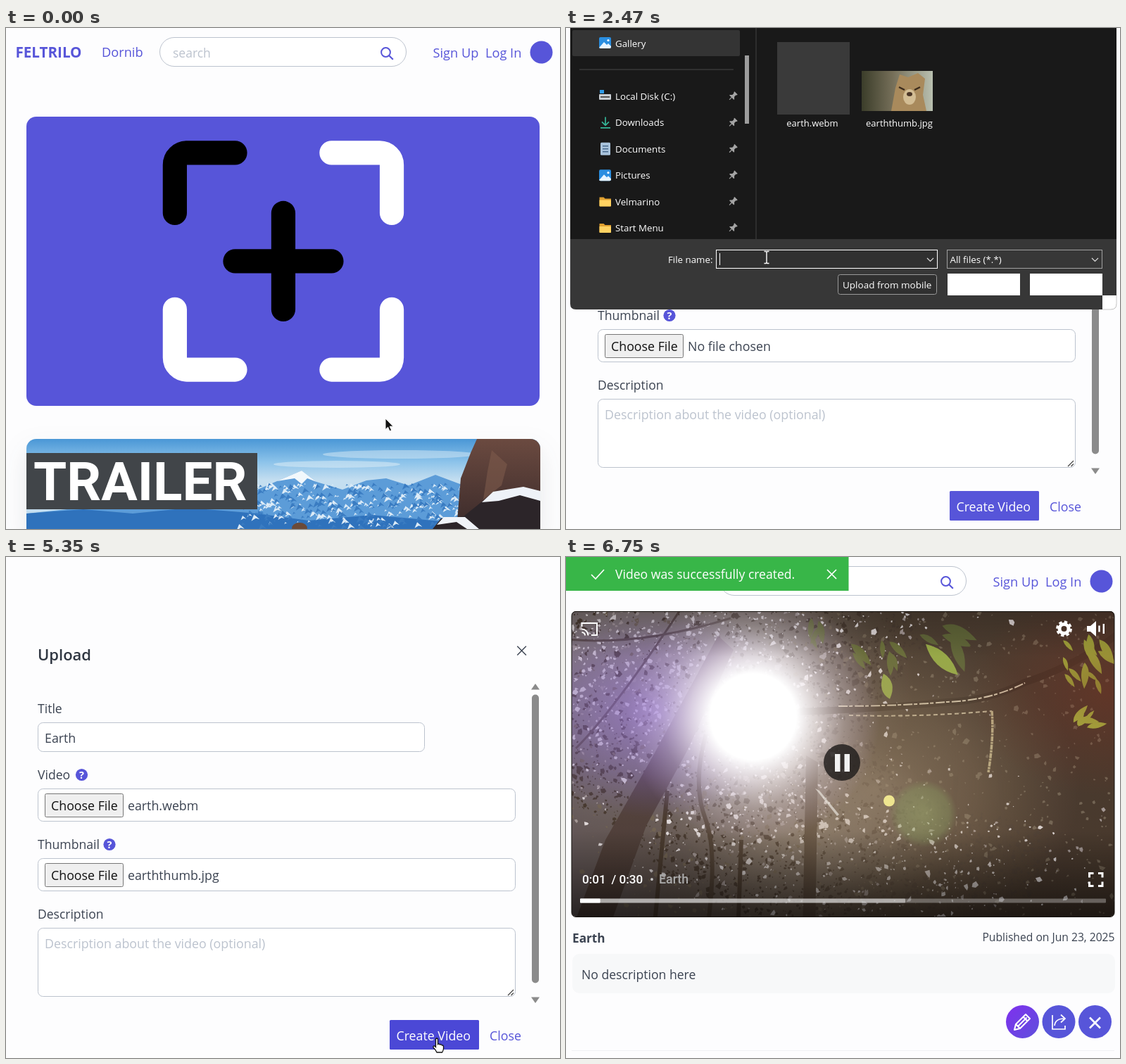
Recreate the animation shown at these times as an HTML page. Size 787x712 px, loop 6830 ms.

```html
<!DOCTYPE html>
<html lang="en">
<head>
<meta charset="utf-8">
<title>Upload a video</title>
<style>
html, body { margin: 0; width: 100%; height: 100%; overflow: hidden; background: #fdfdfe; }
svg { display: block; }
text { font-family: "Open Sans", "Noto Sans", sans-serif; white-space: pre; }
.player text { font-family: Roboto, Arial, sans-serif; font-weight: 500; }
</style>
</head>
<body>
<svg id="stage" width="787" height="712" viewBox="0 0 787 712"></svg>
<script>
const LOOP = 6830, OPEN = 740, PLAY = 5600;
const INK = '#3b4351', BLUE = '#5755d9', LINE = '#bcc3ce', PAGE = '#fdfdfe';

const text = (x, y, s, size = 17.8, fill = INK, more = '') =>
  `<text x="${x}" y="${y}" font-size="${size}" fill="${fill}" ${more}>${s}</text>`;
const rect = (x, y, w, h, fill, r = 0, more = '') =>
  `<rect x="${x}" y="${y}" width="${w}" height="${h}" rx="${r}" fill="${fill}" ${more}/>`;
const circle = (x, y, r, fill, more = '') =>
  `<circle cx="${x}" cy="${y}" r="${r}" fill="${fill}" ${more}/>`;
const oval = (x, y, rx, ry, fill, more = '') =>
  `<ellipse cx="${x}" cy="${y}" rx="${rx}" ry="${ry}" fill="${fill}" ${more}/>`;
const path = (d, fill, more = '') => `<path d="${d}" fill="${fill}" ${more}/>`;
const line = (d, color, w = 1.5, more = '') =>
  `<path d="${d}" fill="none" stroke="${color}" stroke-width="${w}" ${more}/>`;
const group = (id, body, more = '') => `<g id="${id}" ${more}>${body}</g>`;
const stops = list => list.map(([o, c, a = 1]) =>
  `<stop offset="${o}" stop-color="${c}" stop-opacity="${a}"/>`).join('');
const linear = (id, dir, list) => `<linearGradient id="${id}" ${dir}>${stops(list)}</linearGradient>`;
const radial = (id, list) => `<radialGradient id="${id}">${stops(list)}</radialGradient>`;
const DOWN = 'x2="0" y2="1"';

const seeded = s => () => (s = s * 16807 % 2147483647) / 2147483647;
const bell = (x, y, cx, cy, w, h) => Math.exp(-(((x - cx) / w) ** 2) - ((y - cy) / h) ** 2);

const defs = `<defs>
${linear('sky', DOWN, [[0, '#4a97d6'], [.25, '#8cc3ea'], [.45, '#c4def0'], [1, '#c4def0']])}
${linear('rock', DOWN, [[0, '#6b4a40'], [1, '#3a2a2a']])}
${linear('wood', '', [[0, '#4a464c'], [.35, '#453e33'], [.55, '#2f281d'], [1, '#271e15']])}
${linear('bark', DOWN, [[0, '#5a4b58'], [.4, '#3a2f30'], [1, '#261e1a']])}
${linear('fur', '', [[0, '#3b3d2a'], [.45, '#77705a'], [1, '#b9c0b0']])}
${linear('scrim', DOWN, [[0, '#000', .2], [.15, '#000', 0], [.72, '#000', 0], [1, '#000', .6]])}
${linear('edit', 'y2="1"', [[0, '#7f30ee'], [1, '#5f50dc']])}
${radial('glare', [[0, '#eef0f8', .5], [.5, '#c8cbd6', .3], [1, '#a0a0a8', 0]])}
${radial('sun', [[0, '#fff'], [.34, '#fff'], [.5, '#fffaff', .7], [.72, '#f0e6f8', .3], [1, '#d8c0f0', 0]])}
${radial('violet', [[0, '#9a78d8', .75], [.6, '#7f62b8', .4], [1, '#7058a8', 0]])}
${radial('haze', [[0, '#c0a888', .75], [.5, '#a89070', .5], [1, '#907860', 0]])}
${radial('rust', [[0, '#7a3222', .8], [1, '#7a3222', 0]])}
${radial('green', [[0, '#9fb070', .7], [.75, '#8ea565', .5], [1, '#8ea565', 0]])}
<clipPath id="thumbClip">${rect(29, 584, 730, 160, '#000', 14)}</clipPath>
<clipPath id="videoClip">${rect(8, 77, 771, 434, '#000', 6)}</clipPath>
<clipPath id="furClip">${rect(420, 61, 101, 57, '#000')}</clipPath>
</defs>`;

function header() {
  return text(13.5, 42, 'FELTRILO', 20.6, BLUE, 'font-weight="700"') +
    text(136, 41, 'Dornib', 18.2, BLUE) +
    rect(218.5, 13.5, 350, 41, '#fff', 20.5, `stroke="${LINE}"`) +
    text(237, 42, 'search', 17.5, LINE) +
    circle(539.5, 34.5, 6.4, 'none', `stroke="${BLUE}" stroke-width="2"`) +
    line('M544.2 39.2l5.6 5.6', BLUE, 2.2) +
    text(606.5, 42, 'Sign Up', 18.2, BLUE) + text(681, 42, 'Log In', 18.2, BLUE) +
    circle(760.5, 34.5, 16, BLUE);
}

function mountains() {
  const rnd = seeded(77);
  let snow = '', shade = '';
  for (let i = 0; i < 420; i++) {
    const x = 330 + rnd() * 350, y = 646 + rnd() * 60, w = 2 + rnd() * 6;
    const d = `M${x} ${y}l${w} ${w * .9}l${-w * .7} ${-w * .2}l${-w * .8} ${w * .5}z`;
    if (i % 2) snow += d; else shade += d;
  }
  return rect(29, 584, 730, 130, 'url(#sky)') +
    oval(560, 606, 110, 6, '#d5e9f6', 'opacity=".5"') + oval(470, 620, 90, 5, '#e2f0f8', 'opacity=".5"') +
    path('M29 690L357 656L385 644L420 629L441 645L478 656L512 643L540 640L572 650L610 635L650 650V712H29z', '#5c9cd8') +
    path('M29 712V690L110 684L180 690L260 682L357 690L430 700L520 692L650 704V712z', '#2f72bc') +
    path(snow, '#dcebf7') + path(shade, '#3a7cc2') +
    path('M385 644L420 629L441 645L428 640L420 648L410 640z', '#f2f8fc') +
    path('M669 584H759V712H640L646 640L660 604z', 'url(#rock)') +
    path('M690 600l22 20l-8 30l-26 20l6-40z', '#7d5a4c', 'opacity=".6"') +
    path('M606 712L618 697L650 694L690 662L735 655L759 662V712z', '#2c2529') +
    path('M612 706L622 695L652 695L672 712H655L640 702z', '#f0f3f8') +
    path('M676 674L692 659L735 652L759 658V672L730 664L700 672z', '#eef2f8') +
    oval(417, 711, 11, 8, '#6b4a38') +
    rect(29, 604, 328, 80, '#414549') +
    text(39, 670.5, 'TRAILER', 76.5, '#fff', 'style="font-family:Roboto,Arial,sans-serif;font-weight:700"');
}

function home() {
  const corner = (turn, color) =>
    line('M3 8V4A1 1 0 0 1 4 3H8', color, 2, `transform="rotate(${turn} 12 12)"`);
  return rect(0, 0, 787, 712, PAGE) + header() + rect(29, 126, 729, 411, BLUE, 14) +
    `<g transform="translate(188.5 126) scale(17.12)" stroke-linecap="round">` +
    corner(0, '#000') + corner(90, '#fff') + corner(180, '#fff') + corner(270, '#fff') +
    line('M12 8v8M8 12h8', '#000', 2) + '</g>' +
    `<g style="filter:drop-shadow(0 16px 18px rgba(48,55,66,.1))"><g clip-path="url(#thumbClip)">${mountains()}</g></g>`;
}

function field(id, y, w, h) {
  return rect(45.5, y + .5, w, h, '#fff', 7, `stroke="${LINE}"`) +
    group(id + 'Focus', rect(45.5, y + .5, w, h, 'none', 7, `stroke="${BLUE}"`) +
      rect(44.5, y - .5, w + 2, h + 2, 'none', 8, `stroke="${BLUE}" stroke-opacity=".2" stroke-width="2"`));
}

function filePicker(id, label, y, helpX) {
  return text(45, y - 13, label, 17.6) + circle(helpX, y - 19.5, 8.6, BLUE) +
    text(helpX, y - 14.5, '?', 14.5, '#fff', 'text-anchor="middle" font-weight="700"') +
    field(id, y, 678, 46) +
    rect(55.5, y + 7.5, 111, 33, '#efefef', 2, 'stroke="#767676"') +
    text(64, y + 31, 'Choose File', 17.8, '#111') +
    text(173, y + 31, '', 17.8, INK, `id="${id}Name"`);
}

function modal() {
  return rect(0, -40, 787, 800, PAGE) +
    text(45, 147, 'Upload', 22, '#303742', 'font-weight="600"') +
    line('M726.3 126.8l12.6 12.6m0-12.6l-12.6 12.6', INK, 1.4) +
    path('M752 180l6 8.5h-12z', '#8b8b8b') + path('M752 634l6-8.5h-12z', '#8b8b8b') +
    rect(747, 195.5, 10, 410, '#8b8b8b', 5) +
    text(45, 222, 'Title', 17.6) + field('title', 235, 549, 41) +
    text(55, 264, '', 17.8, INK, 'id="titleText"') +
    rect(55, 246, 1.2, 23, '#222', 0, 'id="titleCaret"') +
    filePicker('video', 'Video', 329, 107.5) + filePicker('thumb', 'Thumbnail', 428, 147) +
    text(45, 514, 'Description', 17.5) +
    rect(45.5, 527.5, 678, 97, '#fff', 7, `stroke="${LINE}"`) +
    text(55, 556, 'Description about the video (optional)', 17.8, LINE) +
    line('M713 623l8-8m-3.5 8l3.5-3.5', '#444', 1.2) +
    rect(545, 658, 127, 42, BLUE, 1.5, 'id="create"') +
    text(554.5, 687, 'Create Video', 17.8, '#fff') + text(687, 687, 'Close', 17.8, BLUE);
}

function dialog() {
  const small = (x, y, s, more) => text(x, y, s, 13.3, '#fff', more);
  const picture = y => rect(47, y - 8, 17, 16, '#2a8ee0', 2) +
    path(`M47 ${y + 7}l7-8l4 4l2-2l4 4v1q0 2-2 2H49q-2 0-2-2z`, '#e8f5ff') + circle(60, y - 3.5, 1.6, '#fff');
  const folder = y => path(`M47.5 ${y - 6}h6l2 2h8.5v10q0 1-1 1H48.5q-1 0-1-1z`, '#e0a030') +
    path(`M47.5 ${y - 2}h16.5v8q0 1-1 1H48.5q-1 0-1-1z`, '#ffd262');
  const icons = [
    y => rect(47, y - 3, 17, 8, '#c9ced3', 1) + rect(48, y - 9, 6, 5, '#2f9be8') + rect(49, y, 13, 2, '#555'),
    y => line(`M56 ${y - 8}v12m-5-5l5 5l5-5M49 ${y + 7.5}h14`, '#35b597', 1.7),
    y => rect(49, y - 9, 14, 18, '#a9c3dc', 1.5) + line(`M52 ${y - 4}h8m-8 4h8m-8 4h8`, '#4a6c90', 1.6),
    picture, folder, folder];
  const names = ['Local Disk (C:)', 'Downloads', 'Documents', 'Pictures', 'Velmarino', 'Start Menu'];
  const rows = names.map((name, i) => {
    const y = 97 + i * 37.4;
    return icons[i](y) + small(70, y + 5, name) +
      `<g transform="translate(237 ${y}) rotate(45)">` +
      path('M-3-6.5h6v1.5l-1 1v3l2.5 2.5v1H-4.5v-1L-2-1v-3l-1-1z', '#a5a5a5') +
      line('M0 2v5', '#a5a5a5', 1.2) + '</g>';
  }).join('');
  const fur = `<g clip-path="url(#furClip)">` + rect(420, 61, 101, 57, 'url(#fur)') +
    path('M462 118L468 85L474 66L486 70L500 64L510 72L507 95L512 118z', '#a98a5c') +
    oval(488, 98, 9, 11, '#d3bd94') + oval(488, 94, 4, 3, '#4a3526') +
    line('M473 84l8 4m14 0l8-4', '#3b2b1c', 2.5) + '</g>';
  return path('M6 0H782V392q0 8-8 8H14q-8 0-8-8z', '#373737') + rect(6, 0, 776, 300, '#191919') +
    path('M762 380H782V392q0 8-8 8H762z', '#fff') + line('M782 380V392q0 8-8 8H762', '#c8c8c8', 1) +
    rect(9, 3, 238, 37, '#343434', 2) + picture(21) + small(70, 27, 'Gallery') +
    rect(19, 58.5, 219, 1, '#484848') + rect(254, 39, 6, 97, '#9d9d9d') +
    rect(269, 0, 2, 300, '#2d2d2d') + rows +
    rect(300, 20, 103, 103, '#3a3a3a') + fur +
    text(350, 140, 'earth.webm', 13, '#fff', 'text-anchor="middle"') +
    text(473.5, 140, 'earththumb.jpg', 13, '#fff', 'text-anchor="middle"') +
    small(145, 334, 'File name:') +
    rect(213.5, 315.5, 314, 26, '#303030', 0, 'stroke="#fff"') +
    line('M513 327l4.5 4.5l4.5-4.5M747 327l4.5 4.5l4.5-4.5', '#ddd', 1.1) +
    rect(541.5, 315.5, 220, 26, 'none', 0, 'stroke="#a0a0a0"') +
    small(545.5, 334, 'All files (*.*)') +
    small(218, 334, '', 'id="fileText"') + rect(218, 320, 1, 17, '#fff', 0, 'id="fileCaret"') +
    rect(386.5, 350.5, 140, 28, '#303030', 3, 'stroke="#9a9a9a"') +
    text(393, 370, 'Upload from mobile', 13.5, '#fff') +
    rect(542, 349, 103, 31, '#fff') + rect(659, 349, 103, 31, '#fff');
}

// Leaves hanging around a point, all leaning roughly one way.
function leaves(seed, x, y, n, w, h, size, lean, color) {
  const rnd = seeded(seed);
  let out = '';
  for (let i = 0; i < n; i++) {
    const s = size * (.6 + rnd() * .6), a = lean + (rnd() - .5) * 70;
    out += path(`M0 0Q${s * .35} ${-s * .34} ${s} 0Q${s * .45} ${s * .24} 0 0z`, color,
      `transform="translate(${x + (rnd() - .5) * w} ${y + (rnd() - .5) * h}) rotate(${a})"`);
  }
  return out;
}

// Foliage: many small ragged flecks, brighter where the sky shines through.
function foliage() {
  const rnd = seeded(4242);
  const tones = { '#262019': '', '#5d5647': '', '#9d9a9c': '', '#eceff5': '' };
  const fleck = (x, y, r) => {
    let d = '';
    for (let k = 0; k < 5; k++) {
      const a = k * 1.257, q = r * (.35 + rnd());
      d += `${k ? 'L' : 'M'}${(x + q * Math.cos(a)).toFixed(1)} ${(y + q * Math.sin(a)).toFixed(1)}`;
    }
    return d + 'z';
  };
  for (let i = 0; i < 9000; i++) {
    const x = rnd() * 800, y = 50 + rnd() * 500, pick = rnd(), r = 1 + rnd() * rnd() * 4.5;
    const sky = bell(x, y, 130, 170, 200, 150) + .7 * bell(x, y, 300, 390, 130, 100) +
      .4 * bell(x, y, 520, 450, 170, 70) + .25 * bell(x, y, 400, 130, 120, 70);
    const tone = pick < sky * .5 ? '#eceff5' : pick < sky * .7 ? '#9d9a9c' : pick < sky * .7 + .12 ? '#5d5647' : '#262019';
    if (tone !== '#262019' || sky > .12) tones[tone] += fleck(x, y, r);
  }
  return Object.entries(tones).map(([c, d]) => path(d, c)).join('');
}

function forest() {
  const back = oval(170, 200, 330, 230, 'url(#glare)') + oval(330, 410, 210, 150, 'url(#glare)', 'opacity=".6"') +
    foliage() +
    path('M222 130L244 150L180 290L120 400L62 560H10L62 420L130 300z', 'url(#bark)') +
    path('M347 300L364 310L360 560H342z', '#2c251d') +
    line('M205 270Q185 340 204 390T205 560', '#30291f', 6) +
    line('M150 350L130 560M255 420L250 560M560 330L548 560M620 300L640 560', '#2a2219', 6) +
    line('M8 135Q110 145 240 105M20 290Q80 230 190 60', '#3a322f', 3);
  const bough = line('M330 254Q440 250 540 240Q600 238 650 212Q720 190 787 140', '#1d160f', 10) +
    line('M385 246Q470 246 540 240Q600 238 650 213', '#e9e2c4', 2, 'stroke-dasharray="13 2 5 3"') +
    line('M400 259Q500 262 603 253', '#cfc7a5', 2, 'stroke-dasharray="6 4"') +
    line('M603 253Q606 290 598 340', '#c5bd8c', 3.5, 'stroke-dasharray="7 1 3 1"');
  const far = leaves(12, 722, 185, 13, 60, 70, 34, 65, '#a4cc2c') + leaves(9, 718, 280, 7, 36, 14, 30, -28, '#b4dc34');
  const near = leaves(5, 440, 215, 6, 80, 50, 42, 75, '#4f6224') + leaves(41, 535, 190, 5, 60, 30, 48, 35, '#465824') +
    leaves(8, 375, 190, 4, 30, 50, 34, 95, '#4d5e26') +
    leaves(31, 645, 95, 18, 110, 40, 32, 40, '#82ac2c') +
    path('M525 210Q560 218 571 254Q535 246 525 210z', '#8fb536') + path('M465 252Q485 264 474 288Q456 278 465 252z', '#93b83a');
  return rect(8, 77, 771, 434, 'url(#wood)') + group('back', back) + group('bough', bough) +
    group('far', far) + group('near', near) +
    rect(8, 77, 771, 434, '#b58f78', 0, 'id="veil"') +
    oval(440, 330, 290, 230, 'url(#haze)', 'id="hazeGlow"') +
    oval(770, 190, 200, 150, 'url(#rust)', 'id="rustGlow"') +
    oval(130, 220, 220, 150, 'url(#violet)', 'id="violetGlow"') +
    circle(266, 227, 100, 'url(#sun)', 'id="sunDisc"') +
    circle(508, 365, 48, 'url(#green)', 'id="flare"') + circle(459, 346.5, 8, '#eee58f') +
    path('M354 329L360 332L388 366L385 368z', '#e8e4dc', 'opacity=".7"') + rect(8, 77, 771, 434, 'url(#scrim)');
}

function player() {
  const W = '#fff';
  return `<g clip-path="url(#videoClip)">${forest()}</g>` +
    rect(8, 77.5, 771, 434, 'none', 6, 'stroke="#15120e"') +
    line('M22.5 99v-5H44v17H36M22.5 107a4.5 4.5 0 0 1 4.5 4.5M22.5 102.5a9 9 0 0 1 9 9', W, 2) +
    circle(707.5, 102, 6.5, 'none', 'stroke="#fff" stroke-width="5"') +
    circle(707.5, 102, 9.6, 'none', 'stroke="#fff" stroke-width="3.6" stroke-dasharray="4.3 3.24"') +
    path('M740 98h5l8-7v22l-8-7h-5z', W) + line('M757.5 97.5v9M763.8 95v14', W, 2.4) +
    circle(392, 292, 26, '#1c1a18', 'opacity=".8"') + rect(382, 280, 7.5, 25, '#f2f2f2') + rect(395.5, 280, 7.5, 25, '#f2f2f2') +
    text(23, 464, '', 17.1, W, 'id="clock"') + text(64.5, 464, '/ 0:30', 17.1, W) +
    text(119, 464, '•', 17, '#c4c4c4') + text(132, 464, 'Earth', 17.8, '#aaa') +
    line('M743.5 455.5v-6h6M756 449.5h6v6M762 461.5v6h-6M749.5 467.5h-6v-6', W, 3) +
    rect(20, 485.5, 747, 6, W, 1, 'opacity=".3"') + rect(20, 485.5, 462, 6, W, 1, 'opacity=".45"') +
    rect(20, 485.5, 0, 6, W, 1, 'id="played"');
}

function watch() {
  return rect(0, 0, 787, 712, PAGE) + header() +
    rect(0, 0, 401.5, 48, '#38b648') + line('M36 25l6 6l12-13M371 18l13 13m0-13l-13 13', '#fff', 1.7) +
    text(70, 31, 'Video was successfully created.', 17.6, '#fff') +
    `<g class="player">${player()}</g>` +
    text(9, 548, 'Earth', 17.2, INK, 'font-weight="700"') +
    text(779.5, 546, 'Published on Jun 23, 2025', 15.65, INK, 'text-anchor="end"') +
    rect(9, 564, 771, 56, '#f7f8f9', 10) + text(22, 600, 'No description here', 17.6) +
    circle(648.5, 660.5, 23.5, 'url(#edit)') + circle(700, 660.5, 23.5, BLUE) + circle(751.5, 660.5, 23.5, BLUE) +
    line('M637 672l2-8l14-14l6 6l-14 14zM639 664l6 6M649.5 653.5l6 6M642.5 666.5l12-12', '#fff', 2.1, 'stroke-linejoin="round"') +
    line('M691 651v20h18v-5M694 666q1-10 14-10M703 650.5l6 5.5l-6 5.5', '#fff', 1.7) +
    line('M744 654.5l15 15m0-15l-15 15', '#fff', 2.6) +
    rect(8, 701, 771, 1, '#f0f1f4');
}

const pointer =
  group('arrow', path('M0 0V15.5L3.6 12.2L6 17.8L8.6 16.7L6.2 11.2H11z', '#111', 'stroke="#fff" stroke-width=".9"')) +
  group('hand', path('M-1.5 1Q0-1 1.5 1V8.5Q3 7 4.5 9Q6 8 7.5 10Q9.5 9.5 9.5 12V15Q9 18 7.5 20H0Q-2 16-5 13Q-5.5 10.5-3 11L-1.5 12.5z',
    '#fff', 'stroke="#111" stroke-width="1.3"')) +
  group('ibeam', line('M-3.5-8.5H-1L0-7.5L1-8.5H3.5M0-7.5V7.5M-3.5 8.5H-1L0 7.5L1 8.5H3.5', 'currentColor', 1.4));

document.getElementById('stage').innerHTML = defs + group('home', home()) +
  group('modal', modal()) + group('dialog', dialog()) + group('watch', watch()) + group('cursor', pointer);

const el = {};
document.querySelectorAll('svg [id]').forEach(e => el[e.id] = e);
const set = (id, name, v) => el[id].setAttribute(name, v);
const show = (id, on) => { el[id].style.display = on ? '' : 'none'; };
const within = (t, a, b) => t >= a && t < b;
const ramp = (t, a, b) => Math.min(1, Math.max(0, (t - a) / (b - a)));
const ease = k => k * k * (3 - 2 * k);
const typed = (s, t, a, b) => s.slice(0, Math.round(s.length * ramp(t, a, b)));

// time, x, y, shape of the pointer from then on
const route = [
  [0, 539, 555, 'arrow'], [410, 539, 555, 'arrow'], [490, 531, 530, 'hand'], [660, 450, 400, 'hand'],
  [OPEN, 450, 400, 'arrow'], [1040, 260, 261, 'ibeam'], [1650, 260, 261, 'arrow'], [1980, 112, 354, 'arrow'],
  [2060, 112, 354, 'arrow'], [2300, 285, 326, 'arrow'], [2390, 285, 326, 'ibeam'], [3080, 285, 326, 'arrow'],
  [3340, 112, 452, 'arrow'], [3440, 112, 452, 'arrow'], [3630, 360, 325, 'arrow'], [3790, 360, 325, 'ibeam'],
  [4190, 360, 325, 'arrow'], [4760, 608, 676, 'hand'], [4840, 612, 684, 'hand'], [LOOP, 612, 684, 'hand']];

function movePointer(t, dark) {
  const i = route.findIndex((r, k) => k && t < r[0]) - 1;
  const [t0, x0, y0, kind] = route[i], [t1, x1, y1] = route[i + 1];
  const k = ease(ramp(t, t0, t1));
  set('cursor', 'transform', `translate(${x0 + (x1 - x0) * k} ${y0 + (y1 - y0) * k})`);
  for (const id of ['arrow', 'hand', 'ibeam']) show(id, id === kind);
  el.ibeam.style.color = dark ? '#fff' : '#111';
}

function typeInto(name, s, x, hint) {
  const box = el[name + 'Text'];
  box.textContent = s || hint;
  if (name === 'title') set('titleText', 'fill', s ? INK : LINE);
  set(name + 'Caret', 'x', x + (s ? box.getComputedTextLength() + 1 : 0));
}

function playVideo(t) {
  const s = (t - PLAY) / 1000, p = (t - 6170) / 580;
  const shift = (id, x, y) => set(id, 'transform', `translate(${x * p} ${y * p})`);
  const glow = (id, from, gain) => set(id, 'opacity', Math.max(0, from + gain * p));
  shift('back', -6, -18);
  shift('bough', 2, -34);
  shift('far', 10, -43);
  shift('near', -14, -86);
  set('sunDisc', 'r', 120 + 60 * p);
  glow('violetGlow', .65, .3);
  glow('veil', .04, .2);
  glow('hazeGlow', .05, .6);
  glow('rustGlow', 0, .6);
  glow('flare', .4, .3);
  set('played', 'width', 747 * s / 30);
  el.clock.textContent = '0:0' + Math.floor(s);
}

function render(t) {
  const watching = t >= PLAY;
  const dialogOn = within(t, 2390, 3080) || within(t, 3790, 4190);
  const slide = ease(ramp(t, OPEN, OPEN + 200));
  show('home', t < OPEN + 200);
  show('modal', within(t, OPEN, PLAY));
  show('dialog', dialogOn);
  show('watch', watching);
  show('cursor', !watching);
  if (watching) return playVideo(t);

  set('modal', 'opacity', slide);
  set('modal', 'transform', `translate(0 ${-26 * (1 - slide)})`);
  typeInto('title', typed('Earth', t, 1170, 1400), 55, 'Title');
  show('titleCaret', within(t, 1080, 2040));
  const focus = (id, a, b, full) => set(id + 'Focus', 'opacity', full * (ramp(t, a, a + 120) - ramp(t, b, b + 120)));
  focus('title', 1040, 2040, .85);
  focus('video', 2040, 3420, .6);
  focus('thumb', 3440, 5180, .6);
  el.videoName.textContent = t < 3080 ? 'No file chosen' : 'earth.webm';
  el.thumbName.textContent = t < 4190 ? 'No file chosen' : 'earththumb.jpg';
  set('create', 'fill', t >= 4760 ? '#4b48d6' : BLUE);
  if (dialogOn) typeInto('file', t < 3080 ? typed('earth.webm', t, 2550, 2950) : typed('earththumb.jpg', t, 3800, 4030), 218, '');
  movePointer(t, dialogOn);
}

const start = performance.now();
function tick() {
  render((performance.now() - start) % LOOP);
  requestAnimationFrame(tick);
}
tick();
</script>
</body>
</html>
```
